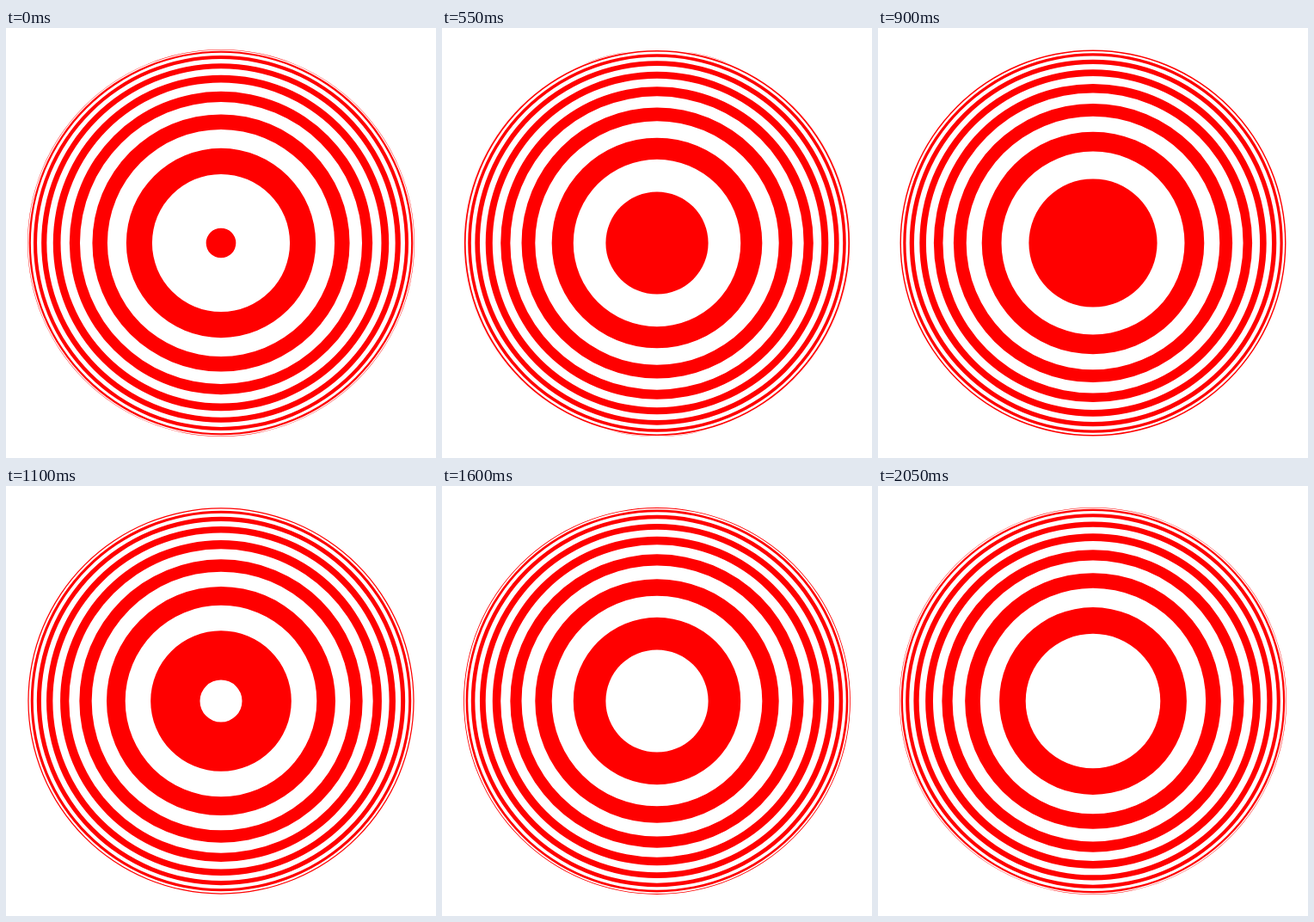
Animation, 500 px wide and 500 px high, one loop 2.1 s. Source, as an HTML page with a canvas:

```html
<!DOCTYPE html>
<html lang="en">
<head>
<meta charset="utf-8">
<title>Striped sphere</title>
<style>
  html, body { margin: 0; width: 100%; height: 100%; overflow: hidden; background: #fff; }
  canvas { display: block; }
</style>
</head>
<body>
<canvas id="stage" width="500" height="500"></canvas>
<script>
const ctx = document.getElementById('stage').getContext('2d');
const CENTER = 250, RADIUS = 225;
const BANDS = 16;          // equal-height slices from pole to equator
const STEP_MS = 50;
const STEPS_PER_BAND = 21;
const LOOP_STEPS = 2 * STEPS_PER_BAND;

function addCircle(r) {
  ctx.moveTo(CENTER + r, CENTER);
  ctx.arc(CENTER, CENTER, r, 0, 2 * Math.PI);
}

// Radius of the sphere's section at depth h below the pole (0..1).
const sectionRadius = h => RADIUS * Math.sqrt(Math.max(0, 1 - (1 - h) ** 2));

function draw(time) {
  const step = Math.floor(Math.max(0, time) / STEP_MS) % LOOP_STEPS;
  const shift = (step % STEPS_PER_BAND + 1) / STEPS_PER_BAND;

  ctx.clearRect(0, 0, 500, 500);
  ctx.fillStyle = '#f00';
  ctx.beginPath();
  for (let k = 0; k < BANDS; k++) addCircle(sectionRadius((k + shift) / BANDS));
  // The rim flips the parity: red pole in the first half, white in the second.
  if (step < STEPS_PER_BAND) addCircle(RADIUS);
  ctx.fill('evenodd');
}

function tick(time) {
  draw(time);
  requestAnimationFrame(tick);
}

draw(0);
requestAnimationFrame(tick);
</script>
</body>
</html>
```
